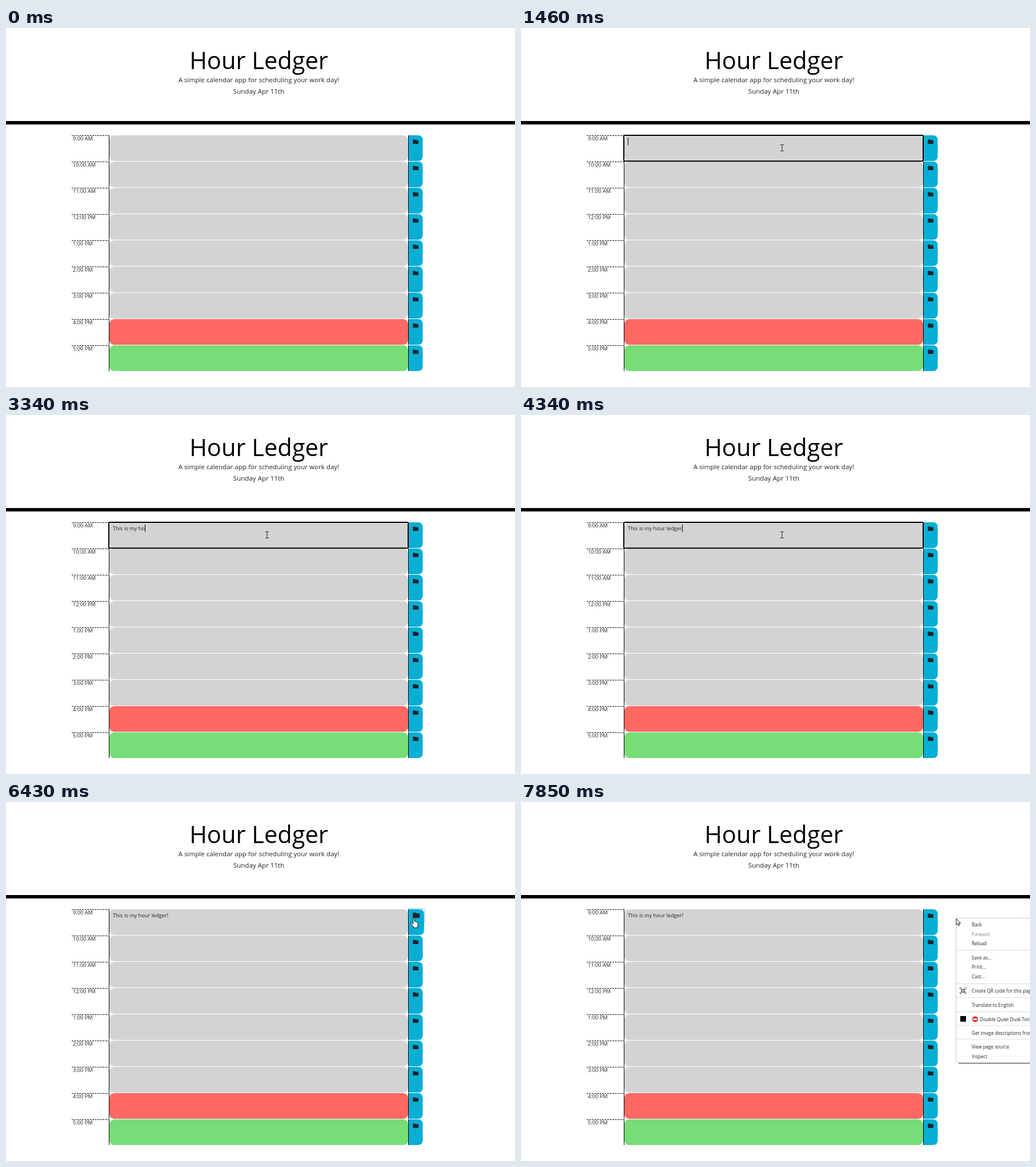
These frames come from a looping animation (891 px wide and 629 px high, 8 s). An HTML page:

```html
<!DOCTYPE html>
<html lang="en">
<head>
<meta charset="utf-8">
<title>Hour Ledger</title>
<style>
  html, body { margin: 0; width: 100%; height: 100%; overflow: hidden; background: #fff; }
  svg { display: block; font-family: "Open Sans", sans-serif; }
  text { white-space: pre; fill: #212529; }
  .small { font-size: 9.23px; }
  .lead { font-size: 11.55px; text-anchor: middle; }
  .menu text { font-size: 8.1px; }
  .pointer > * { stroke-linejoin: round; }
</style>
</head>
<body>
<svg width="891" height="629" viewBox="0 0 891 629">
  <defs>
    <path id="folder" fill="#212529" d="M0 -6.6q0 -1 1 -1h2.7l1.3 1.2h3.8q1 0 1 1v4.4q0 1 -1 1h-7.8q-1 0 -1 -1z"/>
  </defs>
  <text x="442.5" y="72" font-size="41.6" text-anchor="middle" style="fill:#000">Hour Ledger</text>
  <text class="lead" x="442.5" y="95">A simple calendar app for scheduling your work day!</text>
  <text class="lead" x="442.5" y="115">Sunday Apr 11th</text>
  <rect y="163" width="891" height="6"/>
  <g id="rows"></g>

  <rect id="focus" x="180" y="188" width="524" height="45.3" rx="2" fill="none" stroke="#000" stroke-width="2"/>
  <text id="note" class="small" x="187" y="202"></text>
  <rect id="caret" y="192" width="1" height="13"/>
  <rect id="ring" x="704" y="187" rx="2" fill="none" stroke="#007bff" stroke-opacity=".25" stroke-width="2"/>

  <g id="menu" class="menu"></g>

  <g id="pointer" class="pointer">
    <path id="beam" fill="none" stroke="#222" d="M-3 -5.5h2.2l.8 .6l.8 -.6h2.2M0 -5v10M-3 5.5h2.2l.8 -.6l.8 .6h2.2"/>
    <path id="arrow" fill="#fff" stroke="#000" stroke-width=".9" d="M.4 .4v10.8l2.5 -2.3l1.7 3.8l1.7 -.8l-1.7 -3.6h3.4z"/>
    <path id="hand" fill="#fff" stroke="#000" stroke-width=".9" d="M-1.3 9.8V.8q0 -1.3 1.2 -1.3t1.2 1.3v4.6q2 -.6 2.2 .6q1.7 -.4 2 .7q1.8 -.2 1.8 1.4v3.4q0 2 -1.2 3.4v1.6h-6.2v-1.4q-2.2 -2.4 -4.6 -5.8q-.7 -1.2 .3 -1.7q1 -.4 1.9 .7z"/>
  </g>
</svg>
<script>
const LOOP = 8000;
const el = id => document.getElementById(id);
const show = (node, on) => node.setAttribute("visibility", on ? "visible" : "hidden");
const clamp = p => Math.max(0, Math.min(1, p));
const smooth = p => p * p * (3 - 2 * p);
const easeOut = p => 1 - (1 - p) ** 2;
const progress = (t, start, end) => clamp((t - start) / (end - start));

// Planner rows
const HOURS = ["9:00 AM", "10:00 AM", "11:00 AM", "12:00 PM", "1:00 PM", "2:00 PM", "3:00 PM", "4:00 PM", "5:00 PM"];
const rowColor = i => i < 7 ? "#d3d3d3" : i === 7 ? "#ff6961" : "#77dd77";
const buttonPath = width => `M705 0H${705 + width - 8.6}q8.6 0 8.6 8.6V36.4q0 8.6 -8.6 8.6H705z`;

el("rows").innerHTML = HOURS.map((hour, i) => `
  <g transform="translate(0 ${188 + 46 * i})">
    <path d="M115 .5H180" stroke="#000" stroke-dasharray="3 1.5"/>
    <text class="small" x="117" y="9">${hour}</text>
    <rect x="181" width="523" height="45" rx="8.6" fill="${rowColor(i)}"/>
    <path class="button" fill="#06aed5" d="${buttonPath(24.5)}"/>
    <path d="M180.5 0V45M704.5 0V45" stroke="#000"/>
    <use class="icon" href="#folder" transform="translate(712.2 15)"/>
  </g>`).join("");
const button = document.querySelector(".button");
const icon = document.querySelector(".icon");

// Context menu: label and baseline
const MENU = [
  ["Back", 218], ["Forward", 234.5], ["Reload", 251], ["Save as...", 275.5], ["Print...", 292],
  ["Cast...", 308.5], ["Create QR code for this page", 333.5], ["Translate to English", 358.5],
  ["Disable Quiet Dusk Tone", 383.5], ["Get image descriptions from", 408],
  ["View page source", 432], ["Inspect", 448.5]
];
const SEPARATORS = [259.5, 318.5, 342.5, 367.5, 391.5, 415.5];

el("menu").innerHTML = `
  <rect x="766" y="457" width="130" height="2" fill="#999"/>
  <rect x="761.5" y="203.5" width="140" height="253" fill="#fff" stroke="#ccc"/>
  ${SEPARATORS.map(y => `<path d="M762 ${y}H891" stroke="#ddd"/>`).join("")}
  ${MENU.map(([label, y]) => `<text x="${label.startsWith("Disable") ? 803 : 789}" y="${y}"
    ${label === "Forward" ? 'style="fill:#888"' : ""}>${label}</text>`).join("")}
  <path d="M768.5 328v-2.5h2.5M776.5 325.5h2.5v2.5M779 333v2.5h-2.5M771 335.5h-2.5v-2.5" fill="none" stroke="#555"/>
  <path d="M770.5 327.5h2.5v2.5h-2.5zM774.5 327.5h2.5v2.5h-2.5zM770.5 331.5h2.5v2.5h-2.5zM774.5 331.5h2.5v2.5h-2.5z" fill="#555" stroke="#555" stroke-width=".5"/>
  <rect x="769" y="375" width="10" height="10"/>
  <circle cx="795" cy="380.5" r="5" fill="#d9301f"/>
  <rect x="791.5" y="379.3" width="7" height="2.4" fill="#fff"/>`;

// Typing
const NOTE = "This is my hour ledger!";
const KEY_TIMES = [2070, 2240, 2320, 2390, 2470, 2620, 2700, 2780, 2930, 3000, 3170, 3250,
  3340, 3490, 3570, 3720, 3800, 3950, 4020, 4190, 4260, 4340, 4660];
const FOCUS = 1370, BLUR = 6280, BLINK = 530, MENU_OPEN = 7780;

function drawNote(t) {
  const count = KEY_TIMES.filter(time => time <= t).length;
  const lastKey = count ? KEY_TIMES[count - 1] : FOCUS + 90;
  const focused = t >= FOCUS && t < BLUR;
  const note = el("note");
  note.textContent = NOTE.slice(0, count);
  el("caret").setAttribute("x", Math.round(187 + (count ? note.getComputedTextLength() : 0) - .3));
  show(el("focus"), focused);
  show(el("caret"), focused && t >= lastKey && (t - lastKey) % (2 * BLINK) < BLINK);
}

// Pointer moves: start, end, from, to, easing
const MOVES = [
  [290, 1150, [862, 617], [457, 210], easeOut],
  [5050, 5200, [457, 210], [466, 210], smooth],
  [5340, 5900, [466, 210], [701, 206], smooth],
  [5900, 6210, [701, 206], [714, 204], easeOut],
  [7160, 7450, [714, 204], [761.5, 204], smooth]
];

function drawPointer(t) {
  const [start, end, from, to, ease] = MOVES.filter(move => move[0] <= t).pop() || MOVES[0];
  const p = ease(progress(t, start, end));
  const [x, y] = from.map((a, i) => a + (to[i] - a) * p);
  const inRows = y > 188 && y < 601;
  const shape = inRows && x > 181 && x < 704 ? "beam" : inRows && x >= 704 && x < 731 ? "hand" : "arrow";
  el("pointer").setAttribute("transform", `translate(${x} ${y})`);
  for (const id of ["beam", "arrow", "hand"]) show(el(id), t >= MOVES[0][0] && id === shape);
}

function drawButton(t) {
  const grow = t < 7300 ? smooth(progress(t, 6130, 6430)) : 0;
  button.setAttribute("d", buttonPath(24.5 + 2.3 * grow));
  icon.setAttribute("transform", `translate(712.2 15) scale(${1 + .22 * grow})`);
  const ring = el("ring");
  ring.setAttribute("width", 26.5 + 2.3 * grow);
  ring.setAttribute("height", 21 + 3 * grow);
  ring.setAttribute("opacity", t < MENU_OPEN ? progress(t, BLUR - 50, BLUR + 100) : 0);
}

function draw(t) {
  drawNote(t);
  drawButton(t);
  drawPointer(t);
  el("menu").setAttribute("opacity", t < MENU_OPEN ? 0 : .5 + .5 * progress(t, MENU_OPEN, MENU_OPEN + 70));
}

const begin = performance.now();
function tick() {
  draw((performance.now() - begin) % LOOP);
  requestAnimationFrame(tick);
}
tick();
</script>
</body>
</html>
```
